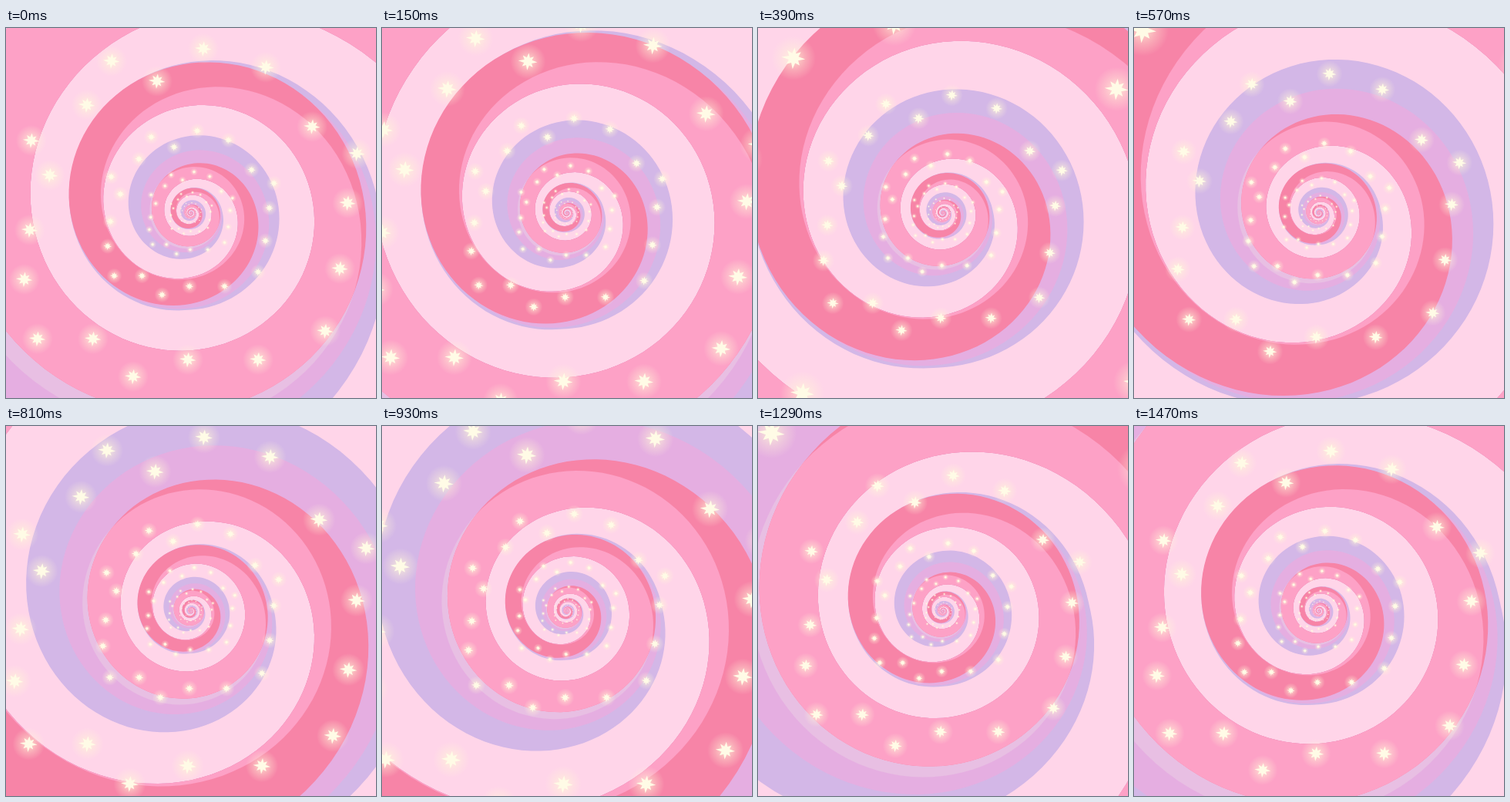
Recreate the animation shown at these times as an HTML page with a canvas. Size 480 px wide and 480 px high, loop 1500 ms.

```html
<!DOCTYPE html>
<html>
<head>
<meta charset="utf-8">
<title>Candy spiral</title>
<style>
  html, body { margin: 0; width: 100%; height: 100%; overflow: hidden; background: #ffd5e9; }
  canvas { display: block; }
</style>
</head>
<body>
<canvas id="stage" width="480" height="480"></canvas>
<script>
const ctx = document.getElementById('stage').getContext('2d');
const LOOP = 1500, SPIRAL_ZOOM = 6, STAR_ZOOM = 4;
const { sin, cos, exp, max, min, PI } = Math;

// A spiral edge as log radius at n quarter turns; it repeats every two turns, 6 times larger.
const GROWTH = Math.log(SPIRAL_ZOOM) / 8;
const edge = (base, swing, phase) => n => base + swing * sin(PI / 4 * (n - phase));
const inner = edge(4.13, 0.15, 0.4);
const rose = edge(4.488, 0.122, 0.4);
const pink = edge(4.358, 0.145, 2.6);
const orchid = edge(4.59, 0.025, 5);
const lavender = edge(4.673, 0.17, 4.5);

function ribbon(outer) {
  const path = new Path2D(), first = -30, last = 14, step = 0.04;
  const add = (n, f) => {
    const r = exp(f(n) + GROWTH * n), a = n * PI / 2;
    path.lineTo(r * cos(a), r * sin(a));
  };
  for (let n = first; n <= last; n += step) add(n, outer);
  for (let n = last; n >= first; n -= step) add(n, inner);
  return path;
}

const bands = [
  ['#d3b7e7', ribbon(n => max(lavender(n), 4.605))],
  ['#e5aee1', ribbon(orchid)],
  ['#e8bfe3', ribbon(pink)],
  ['#f784a7', ribbon(rose)],
  ['#fda1c6', ribbon(n => min(pink(n), rose(n)))]
];

// One ring of stars; every further ring is twice as large.
const stars = [
  [-103, -197], [16, -213], [97, -189], [-44, -171], [-135, -140], [157, -112], [-207, -94],
  [215, -77], [-183, -49], [203, -13], [-209, 22], [193, 72], [-216, 86], [174, 153],
  [-199, 163], [-127, 163], [-4, 190], [87, 190], [-75, 212]
];
const spikes = [10.5, 8.5, 10, 8.5, 11, 9, 9.5, 8.5];
const starShape = new Path2D();
for (let i = 0; i < 16; i++) {
  const r = i % 2 ? 4.6 : spikes[i / 2], a = i * PI / 8 + 0.1;
  starShape.lineTo(r * cos(a), r * sin(a));
}
const glow = ctx.createRadialGradient(0, 0, 3, 0, 0, 20);
glow.addColorStop(0, 'rgba(255,247,215,.65)');
glow.addColorStop(0.5, 'rgba(255,245,215,.3)');
glow.addColorStop(1, 'rgba(255,245,215,0)');

function zoomTo(scale) {
  ctx.setTransform(scale, 0, 0, scale, 240, 240);
}

function drawStar([x, y]) {
  ctx.translate(x, y);
  ctx.fillStyle = glow;
  ctx.fillRect(-20, -20, 40, 40);
  ctx.fillStyle = '#fffbe6';
  ctx.fill(starShape);
  ctx.translate(-x, -y);
}

function draw(now) {
  const p = now % LOOP / LOOP;
  ctx.resetTransform();
  ctx.fillStyle = '#ffd5e9';
  ctx.fillRect(0, 0, 480, 480);
  zoomTo(SPIRAL_ZOOM ** p);
  for (const [color, path] of bands) {
    ctx.fillStyle = color;
    ctx.fill(path);
  }
  for (let ring = -8; ring <= 1; ring++) {
    zoomTo(STAR_ZOOM ** p * 2 ** ring);
    stars.forEach(drawStar);
  }
}

const start = performance.now();
function tick() {
  draw(performance.now() - start);
  requestAnimationFrame(tick);
}
tick();
</script>
</body>
</html>
```
